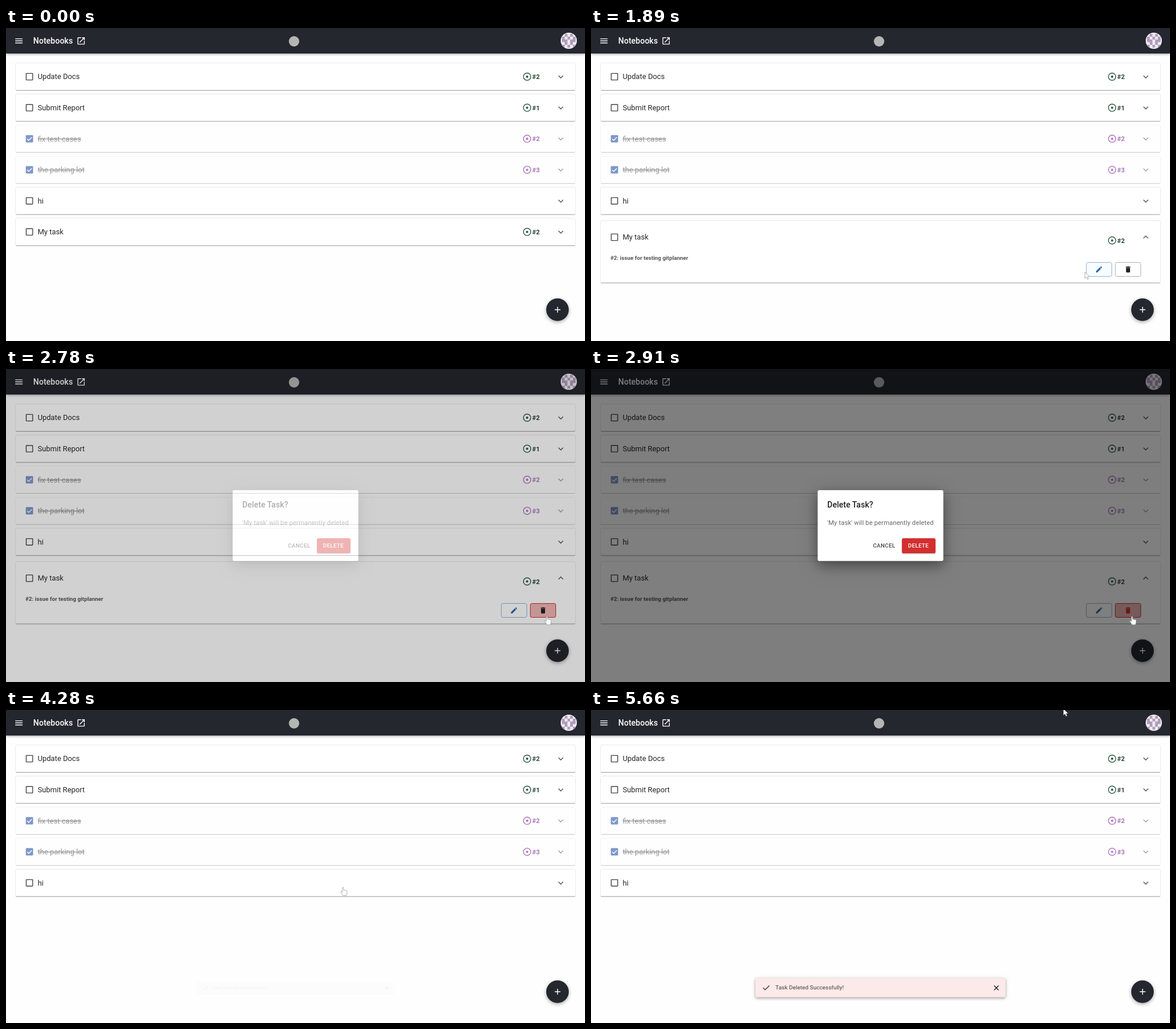
These frames come from a looping animation (1000 px wide and 540 px high, 6.3 s). An HTML page:

```html
<!DOCTYPE html>
<html lang="en">
<head>
<meta charset="utf-8">
<title>Notebooks</title>
<style>
  html, body { margin: 0; width: 100%; height: 100%; overflow: hidden; background: #fefefe; }
  svg { display: block; font-family: Roboto, sans-serif; }
  .line { fill: none; stroke-width: 1.4; }
  .card { fill: #fff; filter: drop-shadow(0 1.2px .6px rgba(0,0,0,.3)) drop-shadow(0 0 .8px rgba(0,0,0,.2)); }
  .label { font-size: 12.78px; fill: #262626; }
  .issue { font-size: 11.1px; font-weight: 700; fill: #2a4636; }
  .issue circle { stroke: #2f5d43; }
  .done { opacity: .55; }
  .done .label { fill: #464646; text-decoration: line-through; }
  .done .issue, .done .dot { fill: #6a0a86; }
  .done .issue circle { stroke: #6a0a86; }
  .button { font-size: 9.72px; font-weight: 500; letter-spacing: .02857em; }
  .cursor { fill: #fff; stroke: #777; stroke-width: .6; stroke-linejoin: round; }
  #dialog .box { filter: drop-shadow(0 8px 10px rgba(0,0,0,.3)) drop-shadow(0 5px 16px rgba(0,0,0,.2)); }
  #toast rect { filter: drop-shadow(0 2px 2px rgba(0,0,0,.25)) drop-shadow(0 1px 3px rgba(0,0,0,.15)); }
  #toast { transform-origin: 500px 479px; }
</style>
</head>
<body>
<svg width="1000" height="540" viewBox="0 0 1000 540">
  <defs>
    <clipPath id="avatarClip"><circle cx="972" cy="22" r="14"/></clipPath>
    <clipPath id="deleteClip"><rect x="537" y="292" width="58" height="26" rx="2.8"/></clipPath>
    <clipPath id="taskClip"><rect id="taskClipRect" x="17" width="966"/></clipPath>
  </defs>
  <rect width="1000" height="540" fill="#fefefe"/>

  <rect width="1000" height="44" fill="#24272e"
        style="filter:drop-shadow(0 1.5px 2px rgba(0,0,0,.4))"/>
  <path class="line" stroke="#fff" d="M16 18.6h12.6M16 22.2h12.6M16 25.7h12.6"/>
  <text x="47" y="27" font-size="13.9" font-weight="500" fill="#fff" letter-spacing=".05">Notebooks</text>
  <path transform="translate(121.4 14) scale(.694)" fill="#fff" d="M19 19H5V5h7V3H5c-1.11 0-2 .9-2 2v14c0 1.1.89 2 2 2h14c1.1 0 2-.9 2-2v-7h-2v7zM14 3v2h3.59l-9.83 9.83 1.41 1.41L19 6.41V10h2V3h-7z"/>
  <circle cx="497.5" cy="23" r="9" fill="#b5b5b3"/>
  <g clip-path="url(#avatarClip)">
    <rect x="958" y="8" width="28" height="28" fill="#efedf0"/>
    <path id="avatar" fill="#b09bbd"/>
  </g>

  <g id="cards"></g>

  <g id="task">
    <rect id="taskBox" class="card" x="17" width="966" rx="1.5"/>
    <g id="taskHead"></g>
    <g clip-path="url(#taskClip)">
      <g id="details">
        <text x="33.5" y="400.3" font-size="9.72" font-weight="700" fill="#555">#2: issue for testing gitplanner</text>
        <rect id="edit" x="855.5" y="404.5" width="44" height="24" rx="2.8" fill="#fff" stroke="#8fb4d8"/>
        <path transform="translate(870.5 409.5) scale(.58)" fill="#2f62a8" d="M3 17.25V21h3.75L17.81 9.94l-3.75-3.75L3 17.25zM20.71 7.04c.39-.39.39-1.02 0-1.41l-2.34-2.34c-.39-.39-1.02-.39-1.41 0l-1.83 1.83 3.75 3.75 1.83-1.83z"/>
        <rect id="trash" x="905.5" y="404.5" width="44" height="24" rx="2.8"/>
        <path id="bin" transform="translate(920.6 409.5) scale(.58)" d="M6 19c0 1.1.9 2 2 2h8c1.1 0 2-.9 2-2V7H6v12zM19 4h-3.5l-1-1h-5l-1 1H5v2h14V4z"/>
      </g>
    </g>
  </g>

  <circle cx="952.5" cy="486" r="19.5" fill="#24272e"
          style="filter:drop-shadow(0 2px 3px rgba(0,0,0,.35))"/>
  <path class="line" stroke="#fff" d="M947.7 486h9.8M952.6 481.1v9.8"/>

  <g id="toast">
    <rect x="284" y="462" width="432" height="33.5" rx="2.8" fill="#fce9e9"/>
    <path class="line" stroke="#443a3a" stroke-width="1.2" d="M297.3 479.3l3.4 3.4 7.3-7.3"/>
    <text x="318.6" y="482.4" font-size="9.72" letter-spacing=".104" fill="#443a3a">Task Deleted Successfully!</text>
    <path class="line" stroke="#222" d="M696.3 475.6l7.6 7.6m0-7.6l-7.6 7.6"/>
  </g>

  <g id="dialog">
    <rect width="1000" height="540" fill="#000" opacity=".5"/>
    <rect class="box" x="391.5" y="209" width="217" height="122.3" rx="2.8" fill="#fff"/>
    <text x="408" y="238.7" font-size="13.9" font-weight="500" fill="#222" letter-spacing=".05">Delete Task?</text>
    <text x="408" y="268.7" font-size="11.1" letter-spacing=".104" fill="#666">'My task' will be permanently deleted</text>
    <text class="button" x="487" y="308.2" fill="#444">CANCEL</text>
    <rect id="confirm" x="537" y="292" width="58" height="26" rx="2.8"
          style="filter:drop-shadow(0 1px 1px rgba(0,0,0,.25))"/>
    <g clip-path="url(#deleteClip)"><circle id="ripple" cx="583" cy="311" fill="#fff" opacity=".3"/></g>
    <text class="button" x="547.5" y="308.2" fill="#fff">DELETE</text>
  </g>

  <g id="cursor">
    <path id="arrow" class="cursor" d="M0 0v11l2.6-2.3 1.8 4.1 1.9-.9-1.8-4h3.4z"/>
    <path id="hand" class="cursor" d="M-1.2 1q0-1.2 1.1-1.2T1 1v4l1.1-.3 1 .4 1 0 .9.5 1 0 1 1v4l-1.2 3.6H0L-2.8 10l-1.1-2.2q.3-1.2 1.5-.5l1.2 1.2z"/>
  </g>
</svg>
<script>
const LOOP = 6300, STEP = 126;
const $ = id => document.getElementById(id);
const set = (id, attrs) => {
  for (const name in attrs) $(id).setAttribute(name, attrs[name]);
};
const show = (id, on) => { $(id).style.display = on ? '' : 'none'; };
const ramp = (t, from, to) => Math.min(1, Math.max(0, (t - from) / (to - from)));
const ease = p => p * p * (3 - 2 * p);

// Row contents, drawn around y = 0.
function row(label, issue, done) {
  const box = done
    ? '<rect x="34.2" y="-6.3" width="12.6" height="12.6" rx="1.4" fill="#1846a0"/><path class="line" stroke="#fff" d="M36.6 .2l2.7 2.7 5.2-5.4"/>'
    : '<rect class="line" x="34.9" y="-5.6" width="11.2" height="11.2" rx=".7" stroke="#444"/>';
  const badge = issue ? `<g class="issue">
    <circle class="line" cx="900" r="6.3"/><circle class="dot" cx="900" r="1.5"/>
    <text x="908.8" y="4">#${issue}</text></g>` : '';
  return `${box}<text class="label" x="54.7" y="4.4">${label}</text>${badge}
    <path class="line chevron" stroke="#555" d="M954.2 -1.8l4 4 4-4"/>`;
}

const rows = [['Update Docs', 2], ['Submit Report', 1], ['fix test cases', 2, true],
  ['the parking lot', 3, true], ['hi']];
$('cards').innerHTML = rows.map((r, i) =>
  `<g class="${r[2] ? 'done' : ''}" transform="translate(0 ${84 + i * 53.55})">
    <rect class="card" x="17" y="-23" width="966" height="46" rx="1.5"/>${row(...r)}</g>`).join('');
$('taskHead').innerHTML = row('My task', 2);
const badge = $('taskHead').querySelector('.issue');
const chevron = $('taskHead').querySelector('.chevron');

set('avatar', {
  d: ['01010', '10101', '11011', '01010', '10101'].map((bits, y) => [...bits].map((bit, x) =>
    +bit ? `M${960.3 + x * 4.67} ${10.3 + y * 4.67}h4.67v4.67h-4.67z` : '').join('')).join('')
});

// Cursor tip: time, x, y.
const path = [[252, 1003, 300], [760, 860, 348], [1020, 850, 350], [1640, 850, 350],
  [1890, 853, 421], [2130, 862, 424], [2500, 934.5, 427], [3024, 934.5, 427],
  [3720, 582, 306], [4900, 582, 306], [5670, 816, -2]];
function cursorAt(t) {
  const i = path.findIndex(p => p[0] > t);
  if (i < 0) return path[path.length - 1].slice(1);
  if (!i) return path[0].slice(1);
  const [a, b] = [path[i - 1], path[i]], p = ease(ramp(t, a[0], b[0]));
  return [a[1] + (b[1] - a[1]) * p, a[2] + (b[2] - a[2]) * p];
}

function draw(t) {
  const open = ease(ramp(t, 1340, 1700));
  const top = 328.7 + 4.3 * open, height = 46.3 + 60 * open;
  show('task', t < 4284);
  set('taskBox', { y: top, height });
  set('taskClipRect', { y: top, height });
  set('taskHead', { transform: `translate(0 ${351.8 + 9.2 * open})` });
  badge.setAttribute('transform', `translate(0 ${5.5 * open})`);
  chevron.setAttribute('transform', `scale(1 ${1 - 2 * open})`);
  set('details', { opacity: open });

  const over = t >= 2380 && t < 3150;
  const pressed = over && t >= 2640;
  set('edit', { fill: t >= 1800 && t < 2300 ? '#fafdff' : '#fff' });
  set('trash', {
    stroke: t < 2380 ? '#b5adad' : over ? '#d32f2f' : '#e08a8a',
    fill: `rgba(211,47,47,${pressed ? .35 : over ? .05 : 0})`
  });
  set('bin', { fill: t < 2898 ? '#222' : '#d32f2f' });

  show('dialog', t > 2701 && t < 4284);
  set('dialog', { opacity: ramp(t, 2701, 2898) });
  set('confirm', { fill: t < 3600 ? '#d32f2f' : '#c02626' });
  set('ripple', { r: t < 4032 ? 0 : 12 + 20 * ramp(t, 4032, 4158) });

  const grow = ramp(t, 4247, 4497), scale = .75 + .25 * grow;
  show('toast', grow > 0);
  set('toast', { opacity: grow ** 1.5 });
  $('toast').style.transform = `scale(${scale}, ${scale * scale})`;

  const hand = (t >= 630 && t < 1800) || over || (t >= 3600 && t < 4400);
  show('cursor', t > 252);
  show('hand', hand);
  show('arrow', !hand);
  set('cursor', { transform: `translate(${cursorAt(t)})` });
}

function tick() {
  const t = performance.now() % LOOP;
  draw(Math.min(49, Math.floor((t + 12) / STEP)) * STEP);
  requestAnimationFrame(tick);
}
tick();
</script>
</body>
</html>
```
